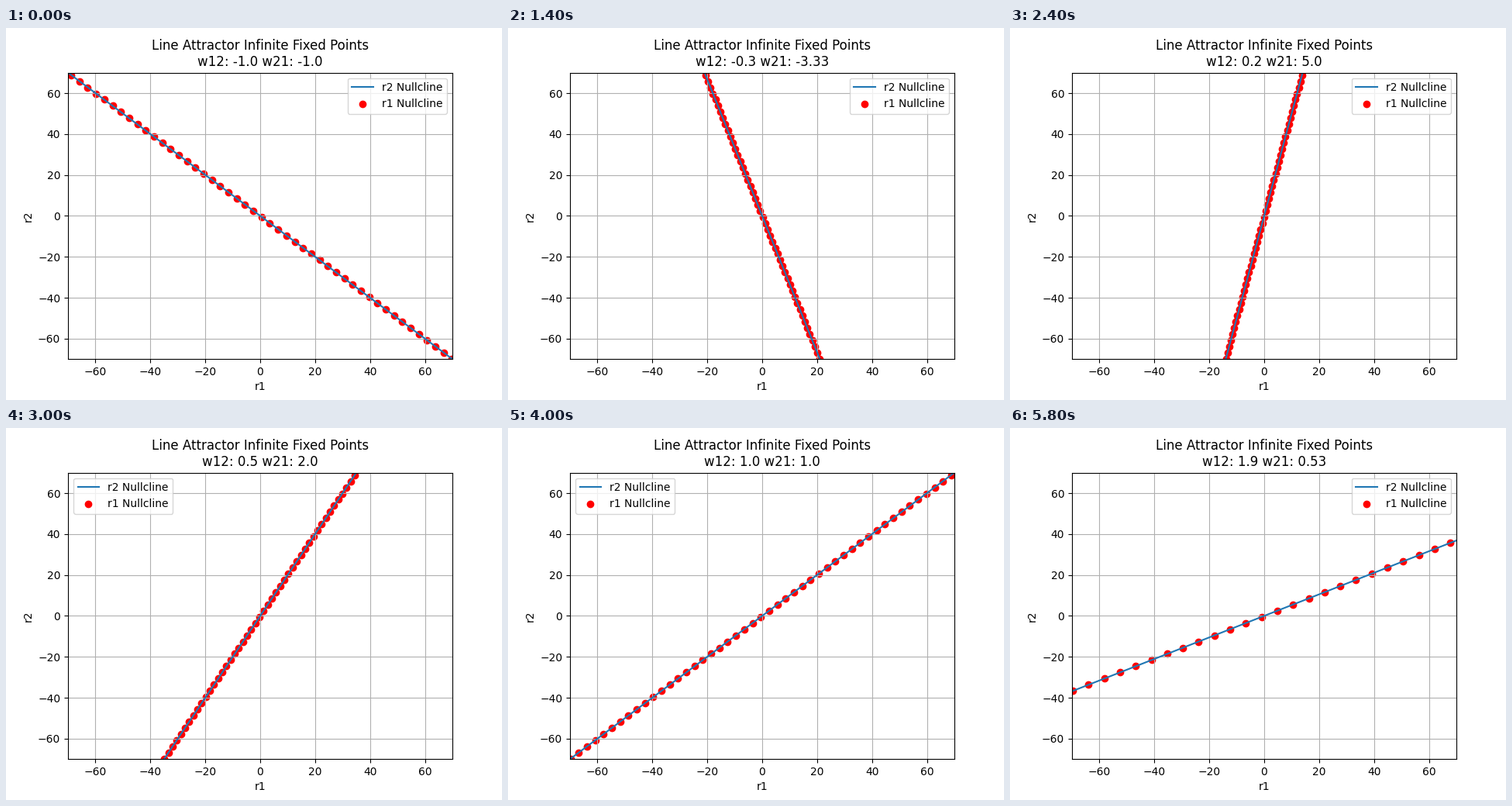
A matplotlib script for the animation above (6000 ms loop, 640x480 px).

```python
import numpy as np
import matplotlib.pyplot as plt
from matplotlib.animation import FuncAnimation

LIMIT = 70
# Floating point leaves the middle weight a hair below zero, so 1 / w stays finite.
weights = np.arange(-1, 2, 0.1)
rates = np.linspace(-100, 500, 200)

fig, ax = plt.subplots(figsize=(6.4, 4.8), dpi=100)


def draw(i):
    w12 = float(weights[i])
    w21 = 1 / w12
    ax.clear()
    ax.plot(rates, w21 * rates, label="r2 Nullcline")
    ax.scatter(w12 * rates, rates, color="red", label="r1 Nullcline")
    ax.set(xlim=(-LIMIT, LIMIT), ylim=(-LIMIT, LIMIT), xlabel="r1", ylabel="r2")
    ax.set_title("Line Attractor Infinite Fixed Points\n"
                 f"w12: {round(w12, 1)} w21: {round(w21, 2)}")
    ax.grid(True)
    ax.legend(loc="best")


anim = FuncAnimation(fig, draw, frames=len(weights), init_func=lambda: None,
                     interval=200, repeat=True, repeat_delay=0)
plt.show()
```
